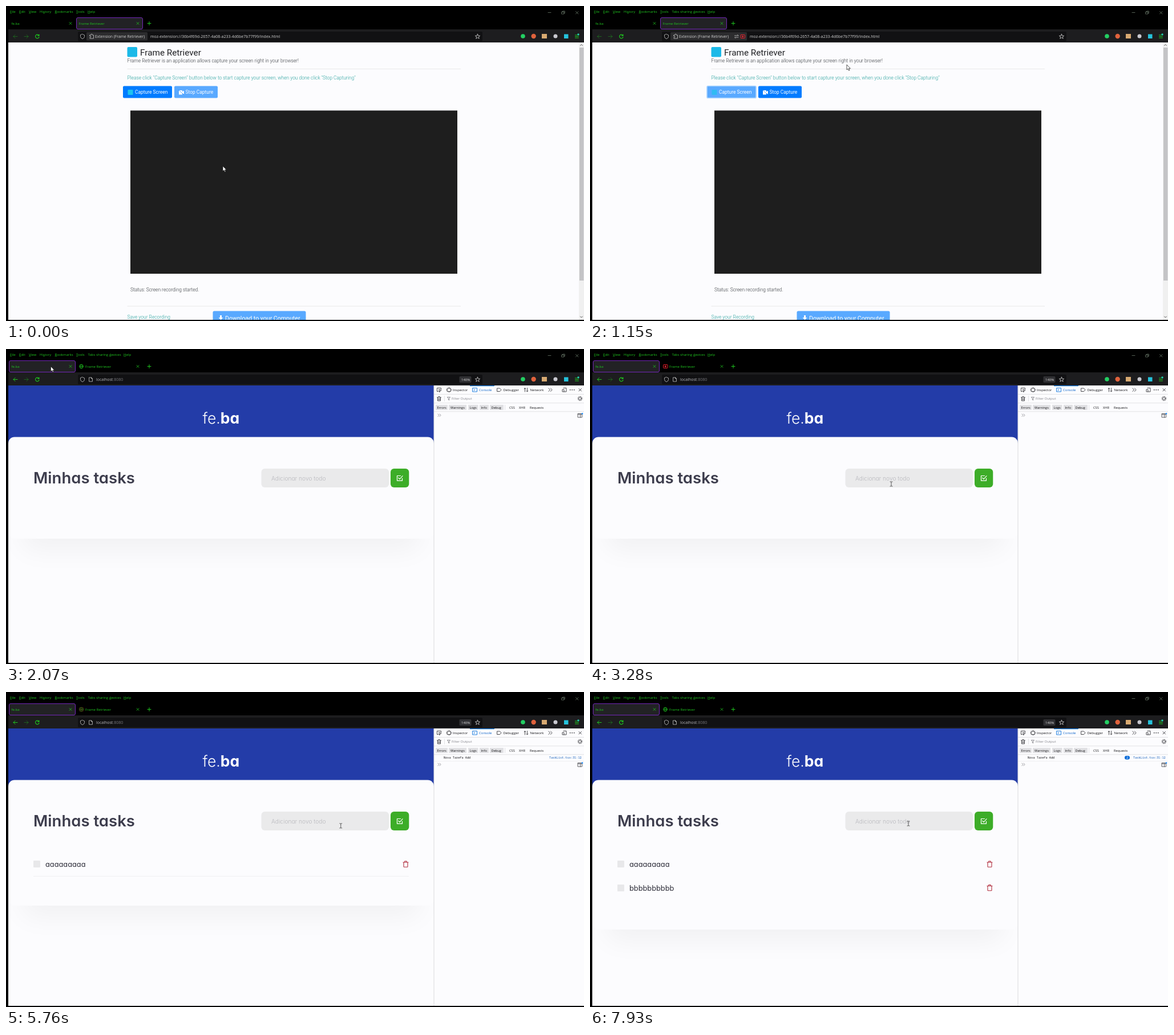
These frames come from a looping animation (1013x553 px, 8 s). An HTML page:

```html
<!DOCTYPE html>
<html lang="en">
<head>
<meta charset="utf-8">
<title>Browser capture demo</title>
<style>
  html, body { margin: 0; width: 100%; height: 100%; overflow: hidden; background: #000; }
  svg { display: block; width: 100vw; height: 100vh; }
  text { white-space: pre; }
  .ui { font: 6.1px "Open Sans", "Noto Sans", sans-serif; }
  .url { font-size: 7px; }
  .green { fill: #1fc41f; }
  .line { fill: none; stroke: currentColor; stroke-linecap: round; stroke-linejoin: round; }
  .u { text-decoration: underline; }
  .page { font: 300 8.44px Roboto, sans-serif; fill: #33373b; }
  .teal { fill: #24a09c; }
  .label { font-weight: 400; fill: #fff; }
  .app { font-family: Inter, sans-serif; font-feature-settings: "cv11"; fill: #2c2c38; }
  .item { font-size: 12.8px; }
  .dev { font: 6px "Open Sans", "Noto Sans", sans-serif; fill: #18181b; }
  .chip { font-size: 5.7px; }
  .mono { font: 5.25px "Noto Sans Mono", monospace; }
</style>
</head>
<body>
<svg viewBox="0 0 1013 553" preserveAspectRatio="none">
  <defs>
    <filter id="soft" x="-20%" y="-100%" width="140%" height="300%"><feGaussianBlur stdDeviation="24"/></filter>
    <clipPath id="view"><path d="M4 64H1013V551H4z"/></clipPath>
    <g id="close" class="line" stroke-width=".8"><path d="M-2-2L2 2M2-2L-2 2"/></g>
    <g id="trash" class="line" color="#b02a3a" stroke-width="1.1">
      <path d="M-4.5-3H4.5M-3.5-3V4.5Q-3.5 5.3-2.7 5.3H2.7Q3.5 5.3 3.5 4.5V-3M-1.7-3V-5H1.7V-3"/>
    </g>
    <g id="globe" class="line" color="#1fc41f" stroke-width=".7">
      <circle r="3.5"/><ellipse rx="1.6" ry="3.5"/><path d="M-3.5 0H3.5"/>
    </g>
  </defs>

  <!-- Browser frame -->
  <path d="M0 0H1013V553H0z"/>
  <path fill="#1d1d1f" d="M4 41H1013V64H4z"/>
  <rect x="126" y="45" width="709" height="17" rx="2" fill="#111113"/>
  <g class="ui green">
    <text x="7" y="11.5"><tspan class="u">F</tspan>ile</text>
    <text x="23" y="11.5"><tspan class="u">E</tspan>dit</text>
    <text x="40" y="11.5"><tspan class="u">V</tspan>iew</text>
    <text x="59" y="11.5">Hi<tspan class="u">s</tspan>tory</text>
    <text x="85.5" y="11.5"><tspan class="u">B</tspan>ookmarks</text>
    <text x="123" y="11.5"><tspan class="u">T</tspan>ools</text>
    <text id="sharingMenu" x="143.5" y="11.5">Tabs sharing <tspan class="u">d</tspan>evices</text>
    <text id="helpMenu" x="143" y="11.5"><tspan class="u">H</tspan>elp</text>
  </g>
  <g class="line" color="#6b7a6b" stroke-width=".8">
    <path d="M950 11.5H955M974 10.5H978V14H974zM975.5 10.5V9H979.3V12.5H978M998.5 9.5L1003 14M1003 9.5L998.5 14"/>
  </g>
  <rect id="activeTab" y="20.5" width="116" height="20" rx="2.5" fill="#222225" stroke="#7326b8"/>
  <g class="ui green">
    <text x="9.5" y="33">fe.ba</text>
    <text id="recTitle" y="33">Frame Retriever</text>
  </g>
  <g color="#1fc41f">
    <use href="#close" x="113" y="30.5"/><use href="#close" x="231" y="30.5"/>
    <path class="line" d="M248 30.5H254M251 27.5V33.5"/>
    <path id="back" class="line" d="M20 53.5H13M16 50.5L13 53.5L16 56.5"/>
    <path class="line" opacity=".4" d="M32 53.5H39M36 50.5L39 53.5L36 56.5"/>
    <path class="line" stroke-width="1.2" d="M57.5 51.5A3.3 3.3 0 1 0 58 54.5M58 50V52.2H55.5"/>
  </g>
  <g id="tabIcon">
    <use id="globeIcon" href="#globe" x="132" y="30.5"/>
    <g id="sharingIcon">
      <rect x="128.5" y="27.5" width="7.5" height="6" rx=".8" fill="none" stroke="#e8202c"/>
      <circle cx="132.2" cy="30.5" r="1.6" fill="#e8202c"/>
    </g>
  </g>
  <path class="line" color="#c8c8c8" stroke-width=".8" d="M134 49.5L137.5 51V53.5Q137.5 56.5 134 57.7Q130.5 56.5 130.5 53.5V51z"/>
  <path class="line" color="#d8d8d8" stroke-width=".8" d="M826.5 49.3L827.7 52.2L830.7 52.3L828.3 54.2L829.2 57.2L826.5 55.5L823.8 57.2L824.7 54.2L822.3 52.3L825.3 52.2z"/>
  <circle cx="906" cy="53" r="3.8" fill="#23cf62"/>
  <circle cx="924.7" cy="53" r="4.2" fill="#e0623c"/>
  <path fill="#d8aa72" d="M939 49H948V57H939z"/>
  <circle cx="963" cy="53" r="3.5" fill="#c9c9d0"/>
  <path fill="#25c3dc" d="M978 49.5H985.5V57H978z"/>
  <path class="line" color="#1fc41f" d="M997.5 51H1001M997.5 53.5H1003.5M997.5 56H1003.5"/>
  <circle cx="1003" cy="50" r="1.7" fill="#22d3b0"/>

  <g id="recUrl" class="ui url" fill="#d0d0d0">
    <rect id="identity" x="141" y="46" height="14.5" rx="1.5" fill="#2c2c2e"/>
    <path class="line" color="#c8c8c8" stroke-width=".8" d="M147 51H149V50A1.2 1.2 0 0 1 151.3 50V51H153.5V57H147V55H148A1.2 1.2 0 0 0 148 52.8H147z"/>
    <text x="156" y="56" font-size="6.8">Extension (Frame Retriever)</text>
    <g id="sharingBadges">
      <path class="line" color="#c8c8c8" stroke-width=".8" d="M253.5 52H260M258.5 50.5L260 52M260 55H253.5L255 56.5"/>
      <rect x="264" y="50.5" width="7.5" height="6" rx=".8" fill="none" stroke="#e8202c"/>
      <circle cx="267.7" cy="53.5" r="1.5" fill="#e8202c"/>
    </g>
    <text id="address" y="56">moz-extension://36b4f69d-2657-4a08-a233-4d6be7b77f99/index.html</text>
  </g>
  <g id="appUrl" class="ui url" fill="#b8b8bc">
    <path class="line" color="#c8c8c8" stroke-width=".8" d="M146 50H149.5L151.5 52V57H146zM149.5 50V52H151.5"/>
    <text x="158" y="56">localhost<tspan fill="#77777c">:8080</tspan></text>
    <rect x="794.5" y="48" width="21" height="11" rx="1.5" fill="#303033"/>
    <text x="798" y="55.5" font-size="6" fill="#ddd">140%</text>
  </g>

  <!-- Recorder page -->
  <g id="recPage" class="page" clip-path="url(#view)">
    <path fill="#fcfcfe" d="M4 64H1013V551H4z"/>
    <rect x="212.5" y="72" width="17.5" height="17.5" rx="2" fill="#1bb9e8"/>
    <text x="235" y="86.8" font-size="15.3" font-weight="400" fill="#202124">Frame Retriever</text>
    <text x="212.5" y="99.3">Frame Retriever is an application allows capture your screen right in your browser!</text>
    <path fill="#e9e9e9" d="M212.5 110H797V111H212.5zM212.5 526.5H797V527.5H212.5z"/>
    <text class="teal" x="212.5" y="129.3">Please click "Capture Screen" button below to start capture your screen, when you done click "Stop Capturing"</text>
    <rect id="captureBtn" x="205" y="140.5" width="86" height="21" rx="2"/>
    <rect id="captureIcon" x="213.5" y="147" width="9" height="9" rx="1" fill="#1fc3ee"/>
    <text class="label" x="226" y="154">Capture Screen</text>
    <rect id="stopBtn" x="295" y="140.5" width="76" height="21" rx="2"/>
    <path fill="#fff" d="M303 148H309V150.5L312 148.5V155L309 153V155.5H303z"/>
    <path stroke="#1686ff" stroke-width=".7" d="M302 147L312 156"/>
    <text class="label" x="314.5" y="154.3">Stop Capture</text>
    <path fill="#1e1e1e" d="M218 183.5H791V470H218z"/>
    <text x="218" y="501.3">Status: Screen recording started.</text>
    <text class="teal" x="212.5" y="548.8">Save your Recording</text>
    <rect x="362.5" y="535.5" width="163" height="26" rx="2.5" fill="#59a9ff"/>
    <path fill="#fff" d="M375 543H378V547H380.5L376.5 551L372.5 547H375z"/>
    <text class="label" x="384" y="552.3" font-size="10.6">Download to your Computer</text>
    <path fill="#f0f0f0" d="M1004 64H1013V551H1004z"/>
    <path fill="#c4c4c6" d="M1005 73H1012.5V482H1005z"/>
    <path class="line" color="#555" d="M1006.5 69.5L1008.5 67.5L1010.5 69.5M1006.5 545L1008.5 547L1010.5 545"/>
  </g>

  <!-- Task page -->
  <g id="appPage" class="app" clip-path="url(#view)">
    <path fill="#fcfcfe" d="M4 64H1013V551H4z"/>
    <rect id="shadow" x="30" width="694" height="80" opacity=".045" fill="#000" filter="url(#soft)"/>
    <path fill="#233ca8" d="M4 64H750V180H4z"/>
    <text x="344.5" y="130.5" font-size="26.5" font-weight="300" fill="#fff">fe.<tspan font-weight="700">ba</tspan></text>
    <rect id="card" x="4" y="154.5" width="746" rx="11" fill="#fcfcfe"/>
    <text x="48" y="236" font-size="27.5" font-weight="600" fill="#3d3d4d">Minhas tasks</text>
    <rect id="field" x="447.5" y="210" width="223.5" height="33" rx="6" fill="#eaeaeb"/>
    <rect id="focusRing" x="447" y="209.5" width="224.5" height="34" rx="7" fill="none" stroke="#1565c0" stroke-width="1.3"/>
    <text id="hint" x="465" y="230.5" font-size="10.2" font-weight="300" fill="#b9b9be">Adicionar novo todo</text>
    <text id="typed" x="465" y="230.5" font-size="10.8"></text>
    <path id="caret" stroke="#222" stroke-width=".8" d="M0 220V234"/>
    <rect id="addBtn" x="674" y="210" width="32.3" height="33" rx="6"/>
    <path class="line" color="#fff" stroke-width="1.2" d="M694.5 227V231.2H685.5V222.5H691.5M687.8 226.2L690 228.3L695 222.8"/>
    <g id="row1">
      <rect x="48" y="296" width="12" height="12" rx="1" fill="#e8e8ea"/>
      <text class="item" x="69" y="306.5">aaaaaaaaa</text>
      <use href="#trash" x="700.5" y="302"/>
    </g>
    <path id="divider" fill="#f0f0f2" d="M48 323H706V324H48z"/>
    <g id="row2">
      <rect x="48" y="338" width="12" height="12" rx="1" fill="#e8e8ea"/>
      <text class="item" x="69" y="348.5">bbbbbbbbbb</text>
      <use href="#trash" x="700.5" y="343.5"/>
    </g>

    <!-- Developer tools -->
    <g class="dev">
      <path fill="#fcfcfe" d="M750 64H1013V551H750z"/>
      <path fill="#d9d9dc" d="M749.5 64H750.5V551H749.5zM750 79H1013V79.7H750zM750 94.5H1013V95.2H750zM750 109.5H1013V110.2H750zM768 82H768.7V92H768zM874 98H874.7V107H874z"/>
      <path fill="#0a72dc" d="M813 64H856V65.2H813z"/>
      <g class="line" color="#38383d" stroke-width=".9">
        <path d="M758 74.5H755.5V68.5H762.5V71M759 71L763 72.5L761 73.5L760 75.5z"/>
        <path d="M773.5 69H779.5V74.5H773.5zM776.5 67.5V69M776.5 74.5V76M772 71.8H773.5M779.5 71.8H781"/>
        <path stroke="#0a72dc" d="M818 68.5H825.5V75H818zM820 70.5L821.5 71.8L820 73"/>
        <path d="M861 69H865.5L868 71.8L865.5 74.5H861z"/>
        <path d="M909.5 75V68.5L908 70M909.5 68.5L911 70M913.5 68.5V75L912 73.5M913.5 75L915 73.5"/>
        <path d="M951 69L953.5 71.7L951 74.5M954.5 69L957 71.7L954.5 74.5"/>
        <path d="M977 68.5H982V75H975V71H978V75"/>
        <path d="M1004 69.5L1008.5 74M1008.5 69.5L1004 74"/>
        <path d="M755.5 85H762.5M756.5 85V91H761.5V85M758 83.5H760M758.2 87V89.5M760 87V89.5"/>
        <path stroke="#88888e" d="M773.5 84.5H778.5L776.7 87V90L775.3 89V87z"/>
        <circle cx="1006" cy="87" r="2.3"/>
        <circle cx="1006" cy="87" r="3.7" stroke-dasharray="1.1 1.8"/>
      </g>
      <path d="M988.5 71.7H989M992 71.7H992.5M995.5 71.7H996" stroke="#38383d" stroke-width="1.5" stroke-linecap="round"/>
      <text x="783" y="74">Inspector</text>
      <text x="829" y="74" fill="#0a62c8">Console</text>
      <text x="871.5" y="74">Debugger</text>
      <text x="918.5" y="74">Network</text>
      <text x="781" y="89.3" fill="#85858b">Filter Output</text>
      <path fill="#e1e1e4" d="M753 98H774V107H753zM776 98H807V107H776zM810 98H827.5V107H810zM830 98H846V107H830zM848 98H872V107H848z"/>
      <g class="chip">
        <text x="755.5" y="104.6">Errors</text><text x="779" y="104.6">Warnings</text>
        <text x="812.5" y="104.6">Logs</text><text x="832.5" y="104.6">Info</text>
        <text x="850.5" y="104.6">Debug</text><text x="882" y="104.6">CSS</text>
        <text x="899" y="104.6">XHR</text><text x="918" y="104.6">Requests</text>
      </g>
      <g id="log" class="mono">
        <text x="767" y="117">Nova Tarefa Add</text>
        <text x="952" y="117" fill="#0a58b8">TaskList.tsx:31:12</text>
        <path fill="#e4e4e7" d="M750 121H1013V121.6H750z"/>
        <g id="repeat">
          <rect x="937" y="112" width="9" height="6.5" rx="3.2" fill="#0a6cd8"/>
          <text x="940" y="117" fill="#fff">2</text>
        </g>
      </g>
      <g id="prompt" class="line" color="#85858b" stroke-width=".8">
        <path d="M757 114L759 116.3L757 118.5M760 114L762 116.3L760 118.5"/>
        <path stroke="#38383d" d="M1002.5 113.5H1009.5V120H1002.5zM1002.5 115H1009.5M1006.5 115V120"/>
        <circle cx="1010" cy="113.5" r="1.3" fill="#0a84ff" stroke="none"/>
      </g>
    </g>
  </g>
  <path d="M0 551H1013V553H0zM0 64H4V553H0z"/>

  <g id="pointer">
    <path id="arrow" fill="#fff" stroke="#111" stroke-width=".7" d="M0 0V9L2.1 7.2L3.6 10.4L5 9.7L3.6 6.7H6.3z"/>
    <path id="beam" class="line" color="#333" stroke-width=".8" d="M-2-4H-.6L0-3.4L.6-4H2M0-3.4V3.4M-2 4H-.6L0 3.4L.6 4H2"/>
    <path id="hand" fill="#fff" stroke="#111" stroke-width=".7" stroke-linejoin="round" d="M-.8 0Q.2-1 1 0V3.5L4.5 4.3Q5.5 4.6 5.3 6L4.5 10.5H0L-3 6.5Q-2.5 5-.8 6.5z"/>
  </g>
</svg>
<script>
  const LOOP = 8000;
  const SHARE = 200, OPEN_APP = 1900, ADD_A = 5200, ADD_B = 7700;
  const KEY_A = 3700, KEY_B = 6900, REPEAT_DELAY = 400, REPEAT_STEP = 33;
  const el = id => document.getElementById(id);
  const set = (id, attrs) => Object.entries(attrs).forEach(([k, v]) => el(id).setAttribute(k, v));
  const show = (id, on) => el(id).style.display = on ? '' : 'none';
  const clamp = (v, lo, hi) => Math.min(hi, Math.max(lo, v));
  const between = (t, a, b) => t >= a && t < b;

  // time, x, y of the pointer's hot spot
  const path = [
    [0, 380, 281], [350, 380, 281], [1150, 450, 103], [1800, 80, 31], [2070, 78.5, 30.5],
    [2350, 78.5, 30.5], [3280, 528, 237], [4430, 528, 237], [4800, 690, 232.5], [5260, 690, 232.5],
    [5850, 580, 235], [7350, 580, 235], [7600, 690, 232], [7720, 690, 232], [7930, 558, 231], [8000, 558, 231]
  ];

  function pointerAt(t) {
    const i = Math.max(1, path.findIndex(p => p[0] > t));
    const [t0, x0, y0] = path[i - 1], [t1, x1, y1] = path[i];
    const u = (t - t0) / (t1 - t0), e = u * u * (3 - 2 * u);
    return [x0 + (x1 - x0) * e, y0 + (y1 - y0) * e];
  }

  // a key held down: one letter, a pause, then quick repeats
  function heldKey(letter, elapsed, max) {
    if (elapsed < 0) return '';
    const repeats = Math.floor((elapsed - REPEAT_DELAY) / REPEAT_STEP) + 1;
    return letter.repeat(1 + clamp(repeats, 0, max - 1));
  }

  function typedAt(t) {
    if (t < ADD_A) return heldKey('a', t - KEY_A, 9);
    return t < ADD_B ? heldKey('b', t - KEY_B, 10) : '';
  }

  function drawBrowser(t, sharing, app) {
    show('sharingMenu', sharing);
    set('helpMenu', { x: sharing ? 206 : 143 });
    set('activeTab', { x: app ? 5.5 : 123.5 });
    set('recTitle', { x: app ? 139 : 127.5 });
    set('back', { opacity: app ? 1 : .4 });
    show('tabIcon', app);
    // three-second cross-fade between the favicon and the sharing sign
    const phase = (t + 900) % 3000;
    const pulse = clamp((1000 - Math.abs(phase - 1500)) / 500, 0, 1);
    set('sharingIcon', { opacity: pulse });
    set('globeIcon', { opacity: 1 - pulse });
    show('recUrl', !app);
    show('appUrl', app);
    show('sharingBadges', sharing);
    set('identity', { width: sharing ? 134 : 107 });
    set('address', { x: sharing ? 280 : 253 });
  }

  function drawRecorder(sharing) {
    const on = '#007bff', off = '#59a9ff';
    set('captureBtn', {
      fill: sharing ? off : on, stroke: sharing ? '#a9d3ff' : 'none', 'stroke-width': 1.7
    });
    set('captureIcon', { opacity: sharing ? .7 : 1 });
    set('stopBtn', { fill: sharing ? on : off });
  }

  function drawTasks(t, hovering) {
    const count = (t >= ADD_A) + (t >= ADD_B);
    const bottom = 333 + 42 * count;
    set('card', { height: bottom - 154.5 });
    set('shadow', { y: bottom - 60 });
    show('row1', count > 0);
    show('divider', count === 1);
    show('row2', count > 1);
    show('log', count > 0);
    show('repeat', count > 1);
    set('prompt', { transform: `translate(0 ${count ? 11 : 0})` });

    const focused = between(t, 3480, ADD_A - 60) || between(t, 6050, ADD_B - 40);
    const text = typedAt(t);
    show('focusRing', focused);
    el('typed').textContent = text;
    show('hint', !text);
    show('caret', focused && Math.floor(t / 600) % 2 === 0);
    const width = text ? el('typed').getComputedTextLength() : 0;
    set('caret', { transform: `translate(${465.3 + width} 0)` });
    set('addBtn', { fill: hovering ? '#379f22' : '#3dad28' });
  }

  function draw(t) {
    const sharing = t >= SHARE, app = t >= OPEN_APP;
    const [x, y] = pointerAt(t);
    const inRow = app && between(y, 210, 243);
    const overField = inRow && between(x, 447, 671);
    const overButton = inRow && between(x, 674, 706);
    show('recPage', !app);
    show('appPage', app);
    drawBrowser(t, sharing, app);
    if (app) drawTasks(t, overButton);
    else drawRecorder(sharing);
    set('pointer', { transform: `translate(${x} ${y})` });
    show('arrow', !overField && !overButton);
    show('beam', overField);
    show('hand', overButton);
  }

  const start = performance.now();
  function tick() {
    draw((performance.now() - start) % LOOP);
    requestAnimationFrame(tick);
  }
  tick();
</script>
</body>
</html>
```
